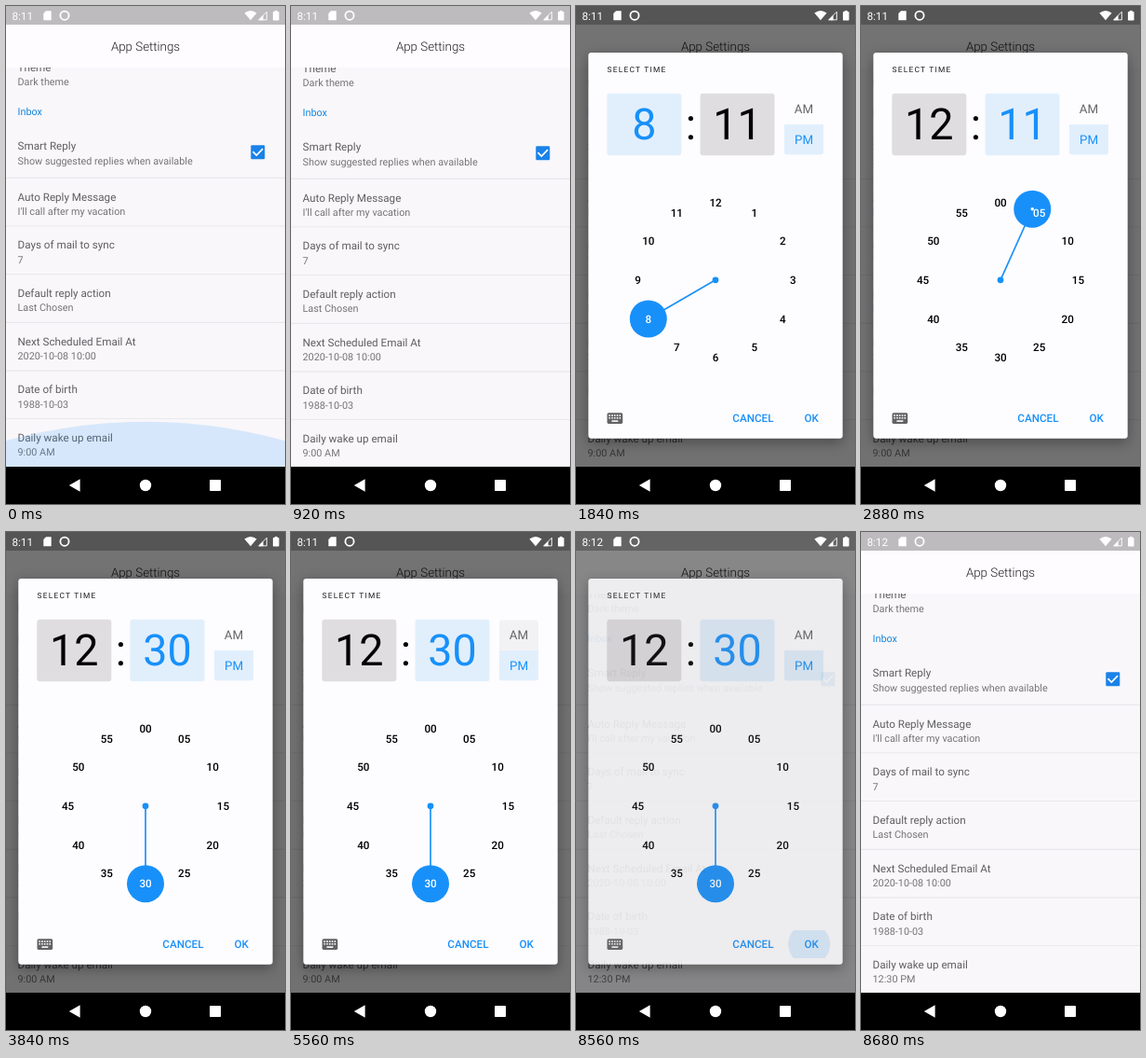
Recreate the animation shown at these times as an HTML page with a canvas. Size 300 by 534 pixels, loop 9320 ms.

```html
<!DOCTYPE html>
<html lang="en">
<head>
<meta charset="utf-8">
<title>App Settings</title>
<style>
html, body { margin: 0; width: 100%; height: 100%; overflow: hidden; background: #000; }
canvas { display: block; width: 300px; height: 534px; }
</style>
</head>
<body>
<canvas id="stage"></canvas>
<script>
const W = 300, H = 534, LOOP = 9320, STEP = 40;
const BLUE = '#1890fa', TINT = '#e1effc', PAPER = '#fdfcfe', INK = '#000', GREY = '#666567';
const dpr = window.devicePixelRatio || 1;

function prepare(canvas) {
  canvas.width = W * dpr;
  canvas.height = H * dpr;
  const c = canvas.getContext('2d');
  c.scale(dpr, dpr);
  c.textRendering = 'geometricPrecision';
  return c;
}
const screen = prepare(document.getElementById('stage'));
const sheet = document.createElement('canvas');
const layer = prepare(sheet);

const clamp = x => Math.max(0, Math.min(1, x));
const span = (t, from, to) => clamp((t - from) / (to - from));
const decelerate = x => 1 - (1 - x) ** 2;

function bezier(x1, y1, x2, y2) {
  const at = (u, a, b) => 3 * u * (1 - u) ** 2 * a + 3 * u * u * (1 - u) * b + u ** 3;
  return x => {
    let lo = 0, hi = 1;
    for (let i = 0; i < 24; i++) {
      const mid = (lo + hi) / 2;
      if (at(mid, x1, x2) < x) lo = mid; else hi = mid;
    }
    return at(lo, y1, y2);
  };
}
const easeOut = bezier(0, 0, 0.58, 1);
const fastOutSlowIn = bezier(0.4, 0, 0.2, 1);

function text(c, str, x, y, size, color, { weight = 400, align = 'left', gap = 0 } = {}) {
  c.font = `${weight} ${size}px Roboto, sans-serif`;
  c.letterSpacing = gap + 'px';
  c.textAlign = align;
  c.fillStyle = color;
  c.fillText(str, x, y);
}

function box(c, x, y, w, h, color, r = 0) {
  c.fillStyle = color;
  c.beginPath();
  c.roundRect(x, y, w, h, r);
  c.fill();
}

function disc(c, x, y, r, color) {
  c.fillStyle = color;
  c.beginPath();
  c.arc(x, y, r, 0, 2 * Math.PI);
  c.fill();
}

function shape(c, points, color) {
  c.fillStyle = color;
  c.beginPath();
  points.forEach(([x, y]) => c.lineTo(x, y));
  c.closePath();
  c.fill();
}

function clipped(c, x, y, w, h, r, draw) {
  c.save();
  c.beginPath();
  c.roundRect(x, y, w, h, r);
  c.clip();
  draw();
  c.restore();
}

const rows = [
  ['Auto Reply Message', "I'll call after my vacation"],
  ['Days of mail to sync', '7'],
  ['Default reply action', 'Last Chosen'],
  ['Next Scheduled Email At', '2020-10-08 10:00'],
  ['Date of birth', '1988-10-03'],
  ['Daily wake up email', '']
];

function item(c, title, sub, y, gap = 15.2) {
  text(c, title, 12.5, y, 11.67, '#5f5e61');
  text(c, sub, 12.5, y + gap, 10.83, '#757477');
}

function drawCheckbox(c) {
  box(c, 263.3, 150.2, 15, 15, '#1a82e8', 1.2);
  c.strokeStyle = '#fff';
  c.lineWidth = 1.7;
  c.beginPath();
  c.moveTo(265.5, 157.2);
  c.lineTo(269.3, 161);
  c.lineTo(276.1, 154.2);
  c.stroke();
}

function drawList(c, t) {
  box(c, 0, 66, W, 428, '#f9f7fa');
  const shift = decelerate(span(t, 0, 240)) - 1;
  clipped(c, 0, 66, W, 428, 0, () => {
    c.save();
    c.translate(0, shift);
    item(c, 'Theme', 'Dark theme', 71, 15.3);
    text(c, 'Inbox', 12.5, 118.2, 10.83, '#1486dc');
    item(c, 'Smart Reply', 'Show suggested replies when available', 154.6, 16.7);
    drawCheckbox(c);
    rows.forEach(([title, sub], i) => {
      const y = 185.2 + i * 51.67;
      box(c, 0, y - 0.4, W, 0.9, '#e5e3e6');
      item(c, title, sub || (t < 8500 ? '9:00 AM' : '12:30 PM'), y + 24.5);
    });
    c.restore();

    if (t >= 1720 && t < 1840) {
      const p = span(t, 1720, 1840);
      clipped(c, 0, 444, W, 50, 0, () =>
        disc(c, 107, 488, 74 + 50 * p, `rgba(0,0,0,${0.07 * (1 - p)})`));
    }
    drawGlow(c, 1 - decelerate(span(t, 0, 760)));
  });
}

function drawGlow(c, power) {
  if (power <= 0) return;
  c.save();
  c.translate(0, 494);
  c.scale(1, 0.8 * power);
  disc(c, 150, 450 - 60.3, 450, `rgba(24,144,250,${0.15 * power})`);
  c.restore();
}

function drawStatus(c, t) {
  const white = '#fff';
  text(c, t < 6600 ? '8:11' : '8:12', 6.5, 14.6, 11.67, white);
  shape(c, [[43, 5.3], [48.7, 5.3], [48.7, 15.3], [40.3, 15.3], [40.3, 8]], white);
  c.strokeStyle = white;
  c.lineWidth = 1.8;
  c.beginPath();
  c.arc(63, 10.2, 4.6, 0, 2 * Math.PI);
  c.stroke();
  c.fillStyle = white;
  c.beginPath();
  c.moveTo(263, 15.3);
  c.lineTo(256.4, 7.6);
  c.quadraticCurveTo(263, 2.6, 269.6, 7.6);
  c.fill();
  shape(c, [[271.3, 15.2], [276.6, 9.8], [276.6, 15.2]], white);
  c.lineWidth = 0.9;
  c.beginPath();
  c.moveTo(271.8, 14.8);
  c.lineTo(280.4, 6.2);
  c.lineTo(280.4, 14.8);
  c.closePath();
  c.stroke();
  box(c, 287, 6, 6.6, 9.5, white, 0.8);
  box(c, 288.8, 4.9, 3, 2, white);
}

function drawNav(c) {
  box(c, 0, 494, W, 40, '#000');
  shape(c, [[67.8, 514], [79.6, 507.2], [79.6, 520.8]], '#fff');
  disc(c, 150, 514, 6.2, '#fff');
  box(c, 219, 508, 12, 12, '#fff', 0.8);
}

function drawDigits(c, str, x, active) {
  box(c, x, 93.7, 80, 66.6, active ? TINT : '#dfdde0', 3.3);
  text(c, str, x + 40, 142.9, 46.67, active ? BLUE : INK, { align: 'center' });
}

// Touch feedback that spreads from the middle of a button, then fades.
function press(c, t, start, y) {
  const p = span(t, start, start + 280);
  if (t < start || p >= 1) return;
  const fade = 1 - span(t, start + 80, start + 280);
  box(c, 224, y, 42, 32.5, `rgba(0,0,0,${0.045 * fade})`);
  if (t > start) disc(c, 245, y + 16, 8 + 36 * p, `rgba(0,0,0,${0.05 * fade})`);
}

function drawPeriod(c, t) {
  const am = t >= 5640 && t < 7480;
  clipped(c, 224, 94.3, 42, 65.2, 3.3, () => {
    box(c, 224, am ? 94.3 : 127, 42, 32.7, TINT);
    press(c, t, 5560, 94.3);
    press(c, t, 7400, 127);
  });
  text(c, 'AM', 245, 115.1, 13.33, am ? BLUE : GREY, { align: 'center' });
  text(c, 'PM', 245, 148.4, 13.33, am ? GREY : BLUE, { align: 'center' });
}

function drawLabels(c, minutes, color) {
  for (let i = 0; i < 12; i++) {
    const a = i * Math.PI / 6;
    const label = minutes ? String(i * 5).padStart(2, '0') : String(i || 12);
    text(c, label, 150 + 83.4 * Math.sin(a), 297.9 - 83.4 * Math.cos(a), 11.67, color,
      { weight: 500, align: 'center' });
  }
}

function handAngle(t) {
  if (t < 2880) return 240;
  if (t < 3840) return 66 * fastOutSlowIn(span(t, 2820, 3020));
  return 180;
}

function drawDial(c, t) {
  const minutes = t >= 2880;
  const deg = handAngle(t), a = deg * Math.PI / 180;
  const cx = 150, cy = 293.8;
  const x = cx + 83.4 * Math.sin(a), y = cy - 83.4 * Math.cos(a);
  drawLabels(c, minutes, INK);
  disc(c, cx, cy, 3.4, BLUE);
  c.strokeStyle = BLUE;
  c.lineWidth = 1.67;
  c.beginPath();
  c.moveTo(cx, cy);
  c.lineTo(x, y);
  c.stroke();
  disc(c, x, y, 20, BLUE);
  clipped(c, x - 20, y - 20, 40, 40, 20, () => drawLabels(c, minutes, '#fff'));
  if (deg % 30) disc(c, x, y, 1.7, '#fff');
}

function drawKeyboard(c) {
  box(c, 33.5, 436.2, 16.7, 11.7, '#626163', 1.6);
  for (let i = 0; i < 5; i++) {
    for (let j = 0; j < 2; j++) box(c, 35.3 + i * 2.8, 438.3 + j * 2.7, 1.6, 1.6, PAPER);
  }
  box(c, 38.4, 444.3, 6.9, 1.6, PAPER);
}

function drawDialog(c, t) {
  c.clearRect(0, 0, W, H);
  c.save();
  c.shadowColor = 'rgba(0,0,0,0.35)';
  c.shadowBlur = 14 * dpr;
  c.shadowOffsetY = 4 * dpr;
  box(c, 13.3, 50, 273.4, 413.7, PAPER, 3.3);
  c.restore();

  const minutes = t >= 2880;
  text(c, 'SELECT TIME', 33.6, 71, 8.33, '#1c1c1d', { gap: 1.25 });
  drawDigits(c, minutes ? '12' : '8', 33.3, !minutes);
  text(c, ':', 123.3, 142.9, 46.67, INK, { align: 'center' });
  drawDigits(c, t < 3840 ? '11' : '30', 133.5, minutes);
  drawPeriod(c, t);
  drawDial(c, t);
  drawKeyboard(c);

  if (t >= 8400) {
    clipped(c, 226.6, 427, 53.3, 30, 3.3, () =>
      disc(c, 250.7, 442, 4 + 18.5 * (t - 8400) / 160, 'rgba(24,144,250,0.14)'));
  }
  const button = { weight: 500, align: 'center' };
  text(c, 'CANCEL', 190.4, 446.1, 11.67, BLUE, button);
  text(c, 'OK', 253.2, 446.1, 11.67, BLUE, button);
}

function dialogOpacity(t) {
  if (t < 1720) return 0;
  return t < 8400 ? easeOut(span(t, 1624, 1774)) : easeOut(1 - span(t, 8514, 8664));
}

function render(t) {
  const c = screen;
  box(c, 0, 0, W, 20, '#bdbbbd');
  drawList(c, t);
  box(c, 0, 20, W, 46, '#fefcfe');
  text(c, 'App Settings', 150, 48, 13.33, '#1f1e20', { weight: 300, align: 'center' });

  const opacity = dialogOpacity(t);
  if (opacity > 0) {
    box(c, 0, 0, W, 494, `rgba(0,0,0,${0.54 * opacity})`);
    drawDialog(layer, t);
    c.globalAlpha = opacity;
    c.drawImage(sheet, 0, 0, W, H);
    c.globalAlpha = 1;
  }
  drawStatus(c, t);
  drawNav(c);
}

const begin = performance.now();
function tick() {
  const t = (performance.now() - begin) % LOOP;
  render(Math.floor(t / STEP) * STEP);
  requestAnimationFrame(tick);
}
tick();
</script>
</body>
</html>
```
